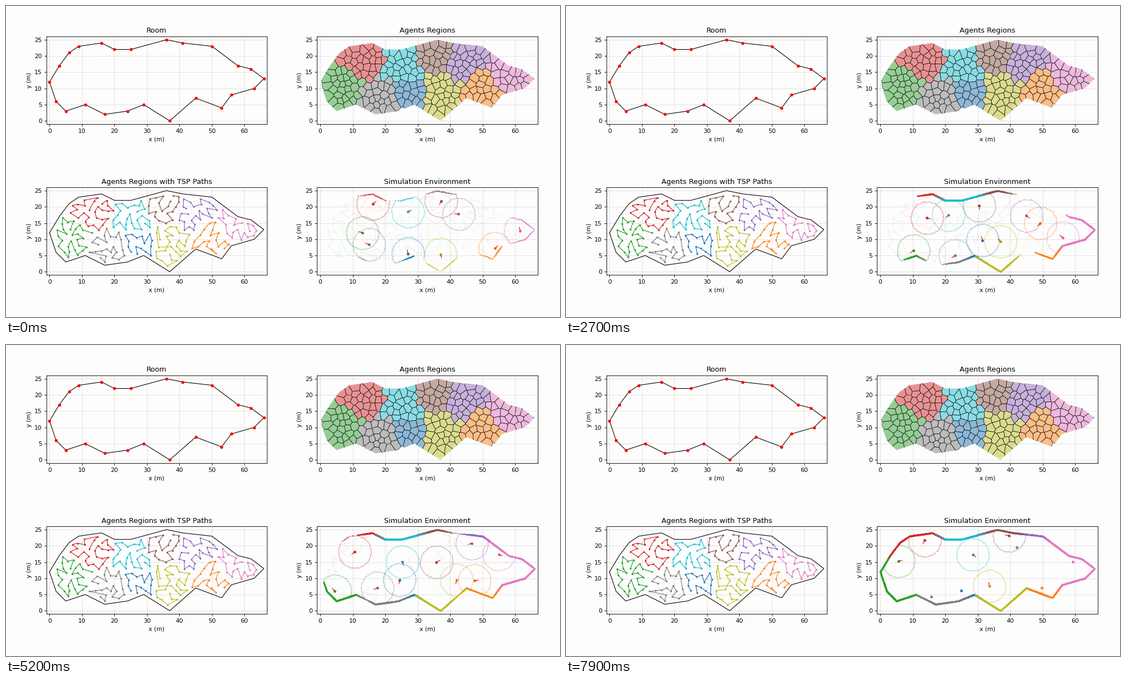
These frames come from a looping animation (998x561 px, 8000 ms). A matplotlib script:

```python
from math import dist

import numpy as np
import matplotlib.pyplot as plt
from matplotlib.animation import FuncAnimation
from matplotlib.collections import PolyCollection
from matplotlib.patches import Polygon
from matplotlib.path import Path

W, H, DPI = 998, 561, 80
FRAMES, STEP = 80, 100
UNIT = 5.85             # pixels per metre
RANGE, RAYS = 5.0, 100  # scanner reach and resolution
SPACING, MARGIN = 1.6, 0.9
BG = "#fdfdfd"
PX = 72 / DPI
KEY_TIMES = [0, 1.1, 2.7, 4.0, 5.2, 6.7, 7.9, 9.5]

rng = np.random.default_rng(7)
plt.rcParams.update({"font.family": "DejaVu Sans", "font.size": 9.7,
                     "axes.titlesize": 11.6, "axes.linewidth": 0.8})

ROOM = np.array([
    (0, 12), (3, 17), (6, 21), (9, 23), (16, 24), (20, 22), (25, 22), (36, 25),
    (41, 24), (50, 23), (58, 17), (62, 16), (66, 13), (63, 10), (56, 8), (53, 4),
    (45, 7), (37, 0), (29, 5), (24, 3), (17, 2), (11, 5), (5, 3), (2, 6)], float)


def ring(n):
    a = np.linspace(0, 2 * np.pi, n, endpoint=False)
    return np.column_stack([np.cos(a), np.sin(a)])


class Agent:
    """Tours its region, reaching each key pose at the matching key time."""

    def __init__(self, color, *keys):
        self.color = "tab:" + color
        self.keys = keys
        self.home = np.mean(keys, axis=0)
        self.stop = KEY_TIMES[len(keys) - 1]

    def plan_tour(self, sites):
        """Cheapest insertion of the sites into the legs between key poses."""
        legs = [list(pair) for pair in zip(self.keys, self.keys[1:])]
        sites = list(sites)
        while sites:
            _, s, leg, i = min(
                ((dist(a, s) + dist(s, b) - dist(a, b) + 0.2 * len(leg), s, leg, i)
                 for s in sites for leg in legs
                 for i, (a, b) in enumerate(zip(leg, leg[1:]), 1)),
                key=lambda option: option[0])
            leg.insert(i, s)
            sites.remove(s)
        self.nodes = np.array([self.keys[0]] + [p for leg in legs for p in leg[1:]])
        run = np.r_[0, np.cumsum(np.hypot(*np.diff(self.nodes, axis=0).T))]
        ends = np.cumsum([0] + [len(leg) - 1 for leg in legs])
        self.t = np.interp(run, run[ends], KEY_TIMES[:len(ends)])

    def pos(self, t):
        return np.column_stack([np.interp(t, self.t, c) for c in self.nodes.T])


AGENTS = [
    Agent("blue", (27, 5.6), (29.5, 6.2), (31.5, 9.7), (28.5, 11),
          (24.4, 9.5), (25, 6.2)),
    Agent("orange", (53.8, 7.2), (52, 12), (49.3, 15), (46.5, 11.4),
          (47.5, 9.3), (49.8, 7.1)),
    Agent("green", (13, 12), (10.3, 10.4), (10.2, 6.5), (5.7, 7.8),
          (4.5, 6.1), (2.6, 11), (5.6, 15.3), (6.4, 13)),
    Agent("red", (16.2, 21), (18, 18.7), (14.4, 16.6), (13.5, 14.4),
          (10.6, 18.2), (8.7, 20.8), (13.7, 21.7), (12.2, 19)),
    Agent("purple", (42.6, 17.8), (41.5, 15.4), (45, 17.3), (49, 18),
          (46.7, 20.8), (41.2, 20), (42, 19.5)),
    Agent("brown", (37.2, 21.8), (35, 23.3), (30.5, 20.4), (30.6, 18),
          (35.8, 15), (37.8, 18.6), (39.7, 23.2), (38, 23.4)),
    Agent("pink", (61.6, 12.6), (60, 12), (56.2, 10.5), (54.2, 14.6),
          (55, 17.4), (59.3, 15.1)),
    Agent("gray", (15, 8.4), (18.8, 10.8), (23, 5), (19.6, 7.7),
          (17.6, 7), (15.7, 4.4)),
    Agent("olive", (37, 5.4), (34.5, 3.4), (37, 9.3), (39, 13.7),
          (42, 9.5), (39, 8), (33.6, 7.6), (34, 10)),
    Agent("cyan", (27, 18.6), (26, 20.5), (21, 17.5), (21.6, 15.3),
          (25.3, 15.1), (26, 13.4), (28.5, 17.3), (29.3, 15)),
]


def scatter_sites(tries=6000):
    """Dart throwing inside the room, kept clear of walls and key poses."""
    darts = rng.uniform((0, 0), (66, 25), (tries, 2))
    room = Path(ROOM)
    for off in MARGIN * ring(8):
        darts = darts[room.contains_points(darts + off)]
    taken = [k for a in AGENTS for k in a.keys]
    fresh = []
    for p in map(tuple, darts.tolist()):
        if all(dist(p, q) > SPACING for q in taken):
            taken.append(p)
            fresh.append(p)
    return fresh


def clip(poly, normal, limit):
    """Keep the part of a convex polygon where p . normal <= limit."""
    out = []
    side = [p @ normal - limit for p in poly]
    for i, p in enumerate(poly):
        a, b = side[i], side[i - 1]
        if a * b < 0:
            out.append(poly[i - 1] + b / (b - a) * (p - poly[i - 1]))
        if a <= 0:
            out.append(p)
    return out


def voronoi(sites):
    cells = []
    for s in sites:
        cell = list(s + 2.1 * ring(12))
        gap = np.hypot(*(sites - s).T)
        for o in sites[(gap > 0) & (gap < 4.2)]:
            cell = clip(cell, o - s, (o @ o - s @ s) / 2)
        cells.append(np.array(cell))
    return cells


def cross(a, b):
    return a[..., 0] * b[..., 1] - a[..., 1] * b[..., 0]


def scan(pos):
    """Range readings from each position; returns points and wall-hit mask."""
    d = ring(RAYS)[None, :, None]
    edge = (np.roll(ROOM, -1, axis=0) - ROOM)[None, None]
    w = ROOM[None, None] - pos[:, None, None]
    den = cross(d, edge)
    den = np.where(abs(den) < 1e-9, 1e-9, den)
    r, u = cross(w, edge) / den, cross(w, d) / den
    r = np.where((r > 0) & (u >= 0) & (u <= 1), r, np.inf).min(axis=2)
    hit = r < RANGE
    r = np.minimum(r, RANGE) + rng.normal(0, 0.06, r.shape)
    return pos[:, None] + r[..., None] * d[:, :, 0], hit


fig = plt.figure(figsize=(W / DPI, H / DPI), dpi=DPI, facecolor=BG)


def panel(left, bottom, title):
    ax = fig.add_axes([left / W, 1 - bottom / H, 68 * UNIT / W, 27 * UNIT / H])
    ax.set(xlim=(-1, 67), ylim=(-1, 26), title=title, xlabel="x (m)",
           ylabel="y (m)", xticks=range(0, 61, 10), yticks=range(0, 26, 5),
           facecolor=BG)
    ax.grid(ls=":", lw=0.8, color="#b0b0b0")
    return ax


room_ax = panel(72.6, 213, "Room")
region_ax = panel(560.2, 213, "Agents Regions")
tour_ax = panel(72.6, 485.2, "Agents Regions with TSP Paths")
sim_ax = panel(560.2, 485.2, "Simulation Environment")

outline = np.vstack([ROOM, ROOM[:1]])
room_ax.plot(*outline.T, "k-", lw=1.1 * PX)
room_ax.plot(*ROOM.T, "o", color="red", ms=5.6 * PX, mew=0)
tour_ax.plot(*outline.T, "k-", lw=1.1 * PX)

regions = {a: [] for a in AGENTS}
for site in scatter_sites():
    regions[min(AGENTS, key=lambda a: dist(a.home, site))].append(site)
for a in AGENTS:
    a.plan_tour(regions[a])

cells = voronoi(np.vstack([a.nodes for a in AGENTS]))
colors = [a.color for a in AGENTS for _ in a.nodes]
mask = Polygon(ROOM, transform=region_ax.transData)
for face, edge, alpha in ((colors, "none", 0.5), ("none", "black", 0.75)):
    region_ax.add_collection(
        PolyCollection(cells, facecolors=face, edgecolors=edge, alpha=alpha,
                       linewidths=0.7 * PX), autolim=False).set_clip_path(mask)

now = np.arange(FRAMES) * STEP / 1000
for a in AGENTS:
    tour_ax.plot(*a.nodes.T, "o-", color=a.color, lw=1.2 * PX, ms=3.2 * PX, mew=0)

    a.track = a.pos(now)
    a.points, a.hit = scan(a.track)
    a.hit &= (now < a.stop)[:, None]
    a.wall = a.points[a.hit]
    a.count = np.cumsum(a.hit.sum(axis=1))

    def line(style, z, **kw):
        return sim_ax.plot([], [], style, zorder=z, **{"color": a.color, **kw})[0]

    a.plan = line("-", 2, lw=0.9 * PX, alpha=0.14)
    a.map = line("o", 3, ms=1.9 * PX, mew=0)
    a.ring = line("o", 3.5, ms=1.6 * PX, mew=0, alpha=0.55)
    a.dot = line("o", 4, ms=5 * PX, mew=0)
    a.aim = line("-", 5, color="red", lw=1.2 * PX)


def update(n):
    t = now[n]
    for a in AGENTS:
        p = a.track[n]
        active = t < a.stop
        a.dot.set_data(*p[:, None])
        a.map.set_data(*a.wall[:a.count[n]].T)
        a.ring.set_data(*a.points[n][~a.hit[n]].T)
        for part in (a.plan, a.ring, a.aim):
            part.set_visible(active)
        if active:
            ahead = a.nodes[a.t > t + 1e-6]
            a.plan.set_data(*np.vstack([p, ahead]).T)
            v = ahead[0] - p
            tip = p + 1.1 * v / (np.hypot(*v) + 1e-9)
            a.aim.set_data(*np.vstack([p, tip]).T)
    return []


anim = FuncAnimation(fig, update, frames=FRAMES, interval=STEP,
                     repeat=True, repeat_delay=0, blit=False)
plt.show()
```
